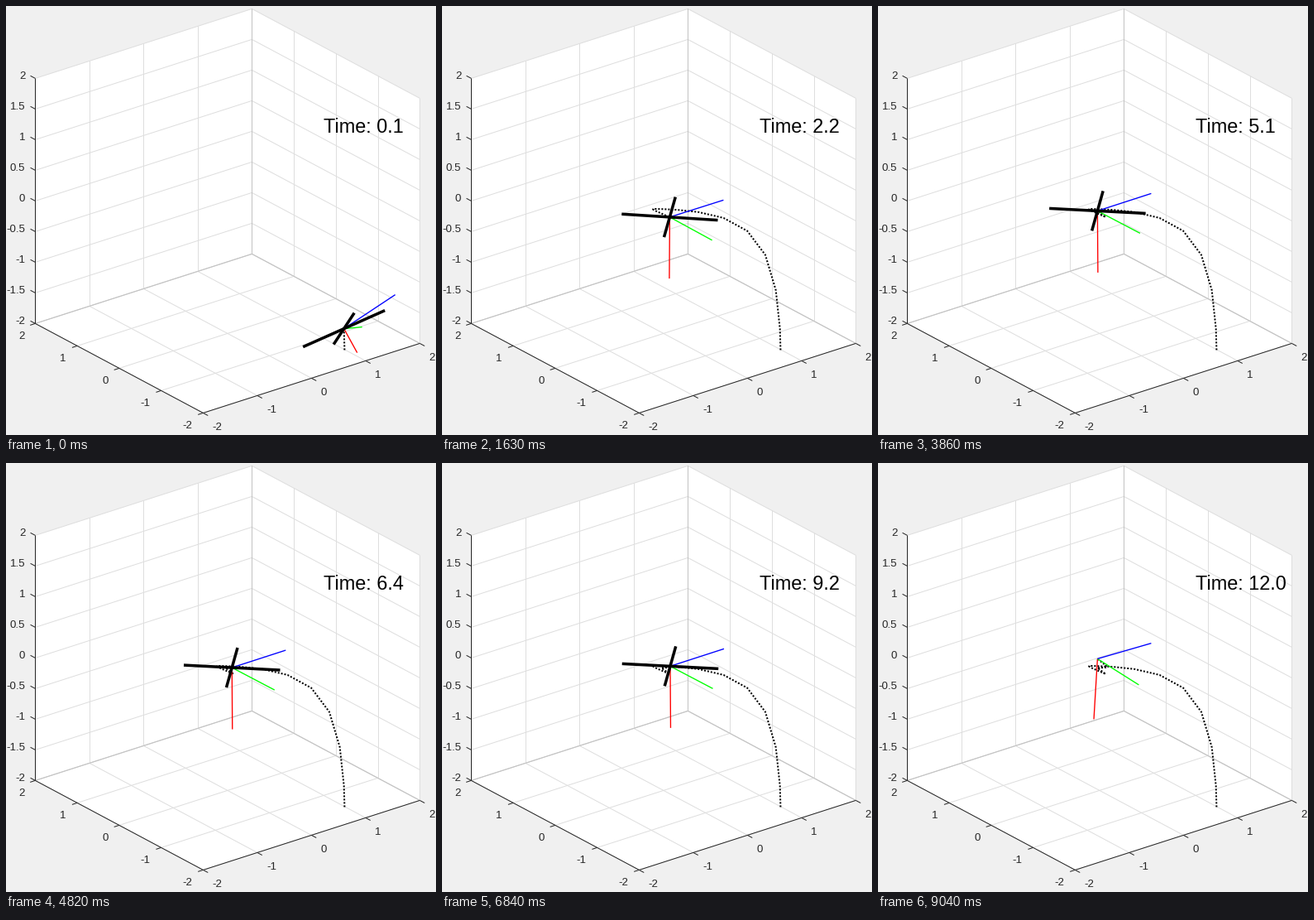
Recreate the animation shown at these times as a matplotlib script. Size 520x518 px, loop 9.68 s.

```python
import numpy as np
import matplotlib.pyplot as plt
from matplotlib.animation import FuncAnimation

W, H, DPI = 520, 518, 100
LOOP, INTERVAL = 9680, 20
LAST = 120  # simulation steps of 0.1 s
PX = 72 / DPI  # points per pixel
FONT = "Liberation Sans"
INK = "#262626"

# Pixel offsets of one unit along each axis, and the corner (-2, -2, -2)
EX, EY, EZ = np.array([65.5, -21]), np.array([-50.75, -27]), np.array([0, -74])
CORNER = np.array([238, 491])

# Hover waypoints: time, x, y
HOVER = np.array([
    (.9, 252, 244.5), (1.6, 275, 254.5), (2.5, 275, 254.5), (4.3, 265, 247),
    (5.1, 265, 247), (7.2, 276.5, 246.5), (10.7, 275, 244), (12, 265, 236)])

# Red, green and blue body axes on screen: level, change when leaning, launch
LEVEL = np.array([(.5, 74.5), (51.5, 27), (65, -21)])
LEAN = np.array([(-6.5, -2), (-2, 6), (0, 3)])
LAUNCH = np.array([(16, 29), (22, -2), (62, -41)])


def bell(t, mid, width):
    return np.exp(-((t - mid) / width) ** 2)


def step_start(k):
    """Time in ms at which step k appears; playback lags a little mid-run."""
    return 55 + 75.35 * (k - 1) + 60 * bell(k, 55, 15)


def centre(t):
    """Launch arc that dies away, on top of an eased drift."""
    times = HOVER[:, 0]
    n = np.clip(np.searchsorted(times, t) - 1, 0, len(times) - 2)
    u = np.clip((t - times[n]) / (times[n + 1] - times[n]), 0, 1)
    ease = (1 - np.cos(np.pi * u)) / 2
    drift = HOVER[n, 1:] + (HOVER[n + 1, 1:] - HOVER[n, 1:]) * ease
    arc = 157 * np.exp(-(t / .6) ** 3), 170.5 * np.exp(-(t / .281) ** 1.75)
    return drift + arc


def pose(t):
    lean = bell(t, 1.1, .8) + .75 * bell(t, 12, .8)
    launch = bell(t, .1, .4)
    hover = LEVEL + lean * LEAN
    red, green, blue = hover + launch * (LAUNCH - hover)
    # The arms start a little ahead of the green axis
    side = green + launch * np.array([15, -1])
    return (red, green, blue), ((blue + side) / 2, (blue - side) / 2)


path = np.array([centre(k / 10) for k in range(LAST + 1)])
starts = step_start(np.arange(1, LAST + 1))

fig = plt.figure(figsize=(W / DPI, H / DPI), dpi=DPI, facecolor="#f0f0f0")
ax = fig.add_axes([0, 0, 1, 1])
ax.set_xlim(-.4, W - .4)
ax.set_ylim(H - .4, -.4)
ax.axis("off")


def project(x, y, z):
    return CORNER + (x + 2) * EX + (y + 2) * EY + (z + 2) * EZ


def segment(a, b, color, width=1, z=1):
    return ax.plot([a[0], b[0]], [a[1], b[1]], color=color, lw=width * PX,
                   solid_capstyle="butt", zorder=z)[0]


def label(x, y, text, size=13.3, align="left", color=INK):
    return ax.text(x, y, text, family=FONT, fontsize=size * PX, ha=align,
                   va="baseline", color=color, zorder=6)


def draw_box():
    outline = [(-2, -2, -2), (2, -2, -2), (2, -2, 2),
               (2, 2, 2), (-2, 2, 2), (-2, 2, -2)]
    ax.fill(*np.array([project(*p) for p in outline]).T, color="white", lw=0,
            zorder=0)

    grid = "#dedede"
    for v in range(-2, 3):
        for a, b in [((v, -2, -2), (v, 2, -2)), ((v, 2, -2), (v, 2, 2)),
                     ((-2, v, -2), (2, v, -2)), ((2, v, -2), (2, v, 2))]:
            segment(project(*a), project(*b), grid)
    for v in np.arange(-2, 2.1, .5):
        segment(project(-2, 2, v), project(2, 2, v), grid)
        segment(project(2, 2, v), project(2, -2, v), grid)
    for end in [(2, 2, 2), (-2, 2, -2), (2, -2, -2)]:
        segment(project(2, 2, -2), project(*end), "#c2c2c2")

    for a, b in [((-2, 2, 2), (-2, 2, -2)), ((-2, 2, -2), (-2, -2, -2)),
                 ((-2, -2, -2), (2, -2, -2))]:
        segment(project(*a), project(*b), INK, z=2)


def draw_ticks():
    for v in range(-2, 3):
        p = project(v, -2, -2)
        segment(p, p - .115 * EY, INK, z=2)
        label(p[0] + 11, p[1] + 20.2, str(v))
        p = project(-2, v, -2)
        segment(p, p - .095 * EX, INK, z=2)
        label(p[0] - 13.2, p[1] + 18.3, str(v), align="right")
    for v in np.arange(-2, 2.1, .5):
        p = project(-2, 2, v)
        segment(p, p + .115 * EY, INK, z=2)
        label(p[0] - 12.2, p[1] + .6, f"{v:g}", align="right")


draw_box()
draw_ticks()
clock = label(384, 152.8, "", size=23.5, color="black")
trail, = ax.plot([], [], color="black", lw=2 * PX, ls=(0, (1, 1)),
                 dash_capstyle="butt", zorder=3)
axis_lines = [segment((0, 0), (0, 0), c, 1.35, 4)
              for c in ("#ff0000", "#00ff00", "#0000ff")]
arm_lines = [segment((0, 0), (0, 0), "black", 3.5, 5) for _ in range(2)]


def place(line, a, b):
    line.set_data([a[0], b[0]], [a[1], b[1]])


def update(i):
    now = (i + .5) * INTERVAL
    step = int(np.searchsorted(starts, now, side="right"))
    k = min(step + 1, LAST)
    t = k / 10
    c = path[k]
    axes, arms = pose(t)

    clock.set_text(f"Time: {t:.1f}")
    trail.set_data(*path[:k + 1].T)
    for line, v in zip(axis_lines, axes):
        place(line, c, c + v)
    for line, v in zip(arm_lines, arms):
        place(line, c - v, c + v)
        line.set_visible(step < LAST)
    return [clock, trail, *axis_lines, *arm_lines]


anim = FuncAnimation(fig, update, frames=LOOP // INTERVAL, interval=INTERVAL,
                     repeat=True, repeat_delay=0)
plt.show()
```
